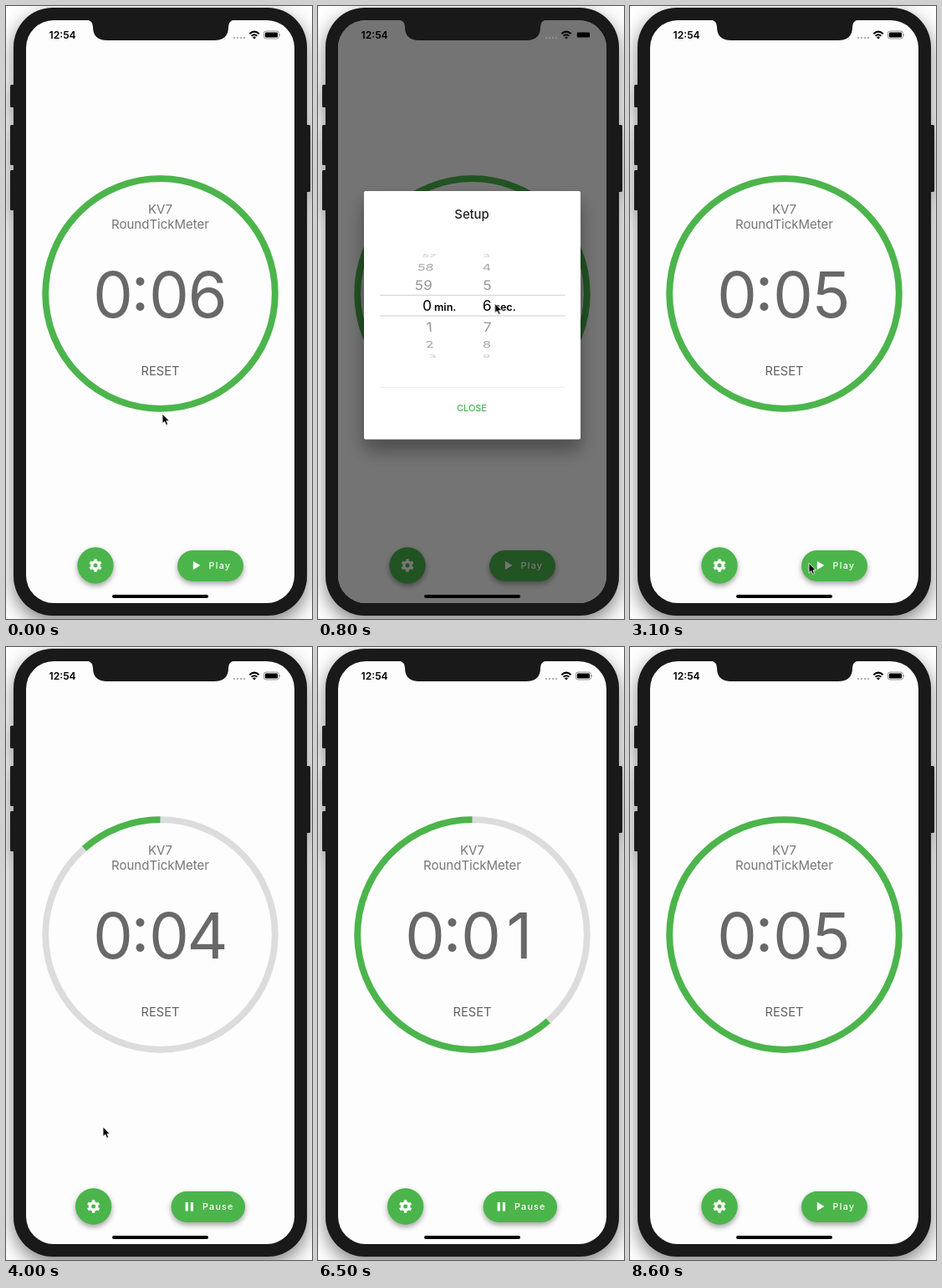
Write an HTML page that moves like this. It is 366 by 732 pixels and loops after 9500 ms.

```html
<!DOCTYPE html>
<html lang="en">
<head>
<meta charset="utf-8">
<title>Countdown</title>
<style>
  html, body { margin: 0; width: 100%; height: 100%; overflow: hidden; background: #fff; }
  svg { display: block; width: 366px; height: 732px; font-family: Inter, Roboto, sans-serif; }
  .mid { text-anchor: middle; }
  .phone { filter: drop-shadow(0 8px 11px rgba(0, 0, 0, .5)); }
  .green { fill: #4bb54b; }
  .fab { filter: drop-shadow(0 3px 3px rgba(0, 0, 0, .36)); }
  .label { font-size: 10.8px; font-weight: 500; letter-spacing: 1.2px; fill: #fff; }
  .card { filter: drop-shadow(0 13px 11px rgba(0, 0, 0, .36)); }
  .clock { font-size: 76px; fill: #686868; }
  .wheel { font-size: 17.5px; text-anchor: end; }
  .unit { font-size: 12.6px; font-weight: 600; }

  .arc, .idle, .busy, .dialog, .press, .cursor { animation: 9500ms linear infinite; }
  .arc { animation-name: arc; stroke-dasharray: 1 2; }
  .idle { animation-name: idle; animation-timing-function: step-end; }
  .busy { animation-name: busy; animation-timing-function: step-end; }
  .dialog { animation-name: dialog; }
  .press { animation-name: press; }
  .cursor { animation-name: cursor; animation-timing-function: ease-in-out; }

  @keyframes arc {
    0%, 36.05% { stroke-dashoffset: 0; }
    36.051% { stroke-dashoffset: 1; }
    88.684%, 100% { stroke-dashoffset: 0; }
  }
  @keyframes idle { 0% { opacity: 1; } 36.05% { opacity: 0; } 88.684%, 100% { opacity: 1; } }
  @keyframes busy { 0% { opacity: 0; } 36.05% { opacity: 1; } 88.684%, 100% { opacity: 0; } }
  @keyframes dialog {
    0%, 4.21% { opacity: 0; }
    6.3%, 30% { opacity: 1; }
    32.1%, 100% { opacity: 0; }
  }
  @keyframes press {
    0%, 25.8% { opacity: 0; }
    27.3%, 34% { opacity: 1; }
    36%, 100% { opacity: 0; }
  }
  @keyframes cursor {
    0% { transform: translate(187px, 487px); }
    3.16%, 4.21% { transform: translate(104px, 666px); }
    8.4%, 11.5% { transform: translate(211.5px, 355px); }
    17%, 22% { transform: translate(198px, 382px); }
    24.8%, 27.4% { transform: translate(181px, 478px); }
    29.4% { transform: translate(212px, 627px); }
    33.2%, 36.3% { transform: translate(214px, 667px); }
    42.1% { transform: translate(116px, 573px); }
    47.4% { transform: translate(95px, 627px); }
    50% { transform: translate(70px, 672px); opacity: 1; }
    50.01%, 100% { transform: translate(70px, 672px); opacity: 0; }
  }
</style>
</head>
<body>
<svg viewBox="0 0 366 732">
  <defs>
    <rect id="screen" x="24" y="17" width="321" height="696" rx="33"/>
    <g id="gear">
      <circle class="green" r="21.7"/>
      <circle r="4.2" fill="none" stroke="#fff" stroke-width="3.4"/>
      <circle r="6.3" fill="none" stroke="#fff" stroke-width="2.8" pathLength="12"
              stroke-dasharray="1 1" stroke-dashoffset="-.5"/>
    </g>
  </defs>

  <g class="phone" fill="#191919">
    <rect x="9" y="2" width="351" height="726" rx="47"/>
    <rect x="5" y="94" width="6" height="27" rx="1.5"/>
    <rect x="5" y="142" width="6" height="48" rx="1.5"/>
    <rect x="5" y="196" width="6" height="48" rx="1.5"/>
    <rect x="358" y="142" width="6" height="80" rx="1.5"/>
  </g>
  <use href="#screen" fill="#fdfdfd"/>

  <g fill="none" stroke-width="7.8" transform="translate(184.5 343.5) rotate(-90) scale(1 -1)">
    <circle r="137.3" stroke="#dcdcdc"/>
    <circle class="arc" r="137.3" stroke="#4bb54b" pathLength="1"/>
  </g>
  <g class="mid" font-size="15" fill="#757575">
    <text x="184.5" y="247.7">KV7</text>
    <text x="184.5" y="266.3">RoundTickMeter</text>
    <text x="184.5" y="440.8" font-size="14.7" fill="#616161">RESET</text>
  </g>
  <g class="clock mid">
    <text x="128" y="371.5">0</text>
    <text x="160.5" y="363.5">:</text>
    <text x="195" y="371.5">0</text>
    <text id="digit" x="241" y="371.5">6</text>
  </g>

  <g class="idle">
    <use class="fab" href="#gear" x="107" y="668"/>
    <rect class="fab green" x="205" y="650" width="79" height="37" rx="18.5"/>
    <path d="M223.8 662.8L232.3 668L223.8 673.2Z" fill="#fff"/>
    <text class="label" x="242.6" y="672">Play</text>
  </g>
  <g class="busy">
    <use class="fab" href="#gear" x="104.6" y="668"/>
    <rect class="fab green" x="197.5" y="650" width="88.5" height="37" rx="18.5"/>
    <path d="M214.6 663h3.2v10.4h-3.2zM220.8 663h3.2v10.4h-3.2z" fill="#fff"/>
    <text class="label" x="235" y="672">Pause</text>
  </g>

  <g class="dialog">
    <use href="#screen" fill-opacity=".54"/>
    <rect class="card" x="55" y="221" width="259" height="296.5" rx="2" fill="#fff"/>
    <text class="mid" x="184" y="254" font-size="14.8" font-weight="500" fill="#212121">Setup</text>
    <path d="M74 345.3H295.5M74 370H295.5" stroke="#ccc"/>
    <path d="M74 455.5H295.5" stroke="#eee"/>
    <g id="minutes" class="wheel"></g>
    <g id="seconds" class="wheel"></g>
    <text class="unit" x="139" y="363.5">min.</text>
    <text class="unit" x="211" y="363.5">sec.</text>
    <rect class="press" x="73.5" y="465" width="222" height="30" fill="#fafafa"/>
    <text class="mid green" x="184" y="484" font-size="10.9" font-weight="500">CLOSE</text>
  </g>

  <path d="M96 16.5Q104 17 104 25Q104 41 121 41H249Q266 41 266 25Q266 17 274 16.5Z" fill="#191919"/>
  <text x="51.5" y="39" font-size="12.2" font-weight="600">12:54</text>
  <path d="M273 38H287" stroke="#999" stroke-opacity=".75" stroke-width="2.4" stroke-linecap="round" stroke-dasharray="0 4"/>
  <g fill="none" stroke="#000" stroke-width="2">
    <path d="M291.3 33.2Q297 28 302.7 33.2M293.6 35.8Q297 32.6 300.4 35.8"/>
    <path d="M295 37.4Q297 35.8 299 37.4L297 39.4Z" fill="#000" stroke="none"/>
  </g>
  <rect x="308.4" y="30" width="18" height="9" rx="2.6" fill="none" stroke="#777" stroke-width=".8"/>
  <rect x="309.8" y="31.4" width="15.2" height="6.2" rx="1.4"/>
  <path d="M327.4 33V36Q329 34.5 327.4 33Z" fill="#777"/>
  <rect x="127" y="703" width="115" height="4" rx="2"/>

  <path class="cursor" d="M0 0V11.6L2.7 9.2L4.6 13.4L6.7 12.5L4.9 8.4H8.5Z"
        stroke="#fff" stroke-width=".9" stroke-linejoin="round"/>
</svg>
<script>
  const LOOP = 9500, START = 3425, RUN = 5000;
  const STEP = 0.403, RADIUS = 63.8;
  const $ = id => document.getElementById(id);

  // A row of the picker drum: foreshortened, sheared and faded by its angle.
  function place(row, n, value, x, lean) {
    const a = (n - value) * STEP, c = Math.cos(a), s = Math.sin(a);
    const size = 1 - 0.26 * (1 - c);
    const left = x + lean * RADIUS * (1 - c);
    row.setAttribute('transform',
      `matrix(${size} 0 ${lean * s} ${size * c} ${left} ${358 + RADIUS * s})`);
    const near = Math.abs(a) < STEP / 2;
    row.setAttribute('opacity', Math.abs(a) > 1.5 ? 0 : near ? 1 : 0.14 + 0.3 * c);
  }

  function makeWheel(id, first, last) {
    const rows = [];
    for (let n = first; n <= last; n++) {
      const el = document.createElementNS('http://www.w3.org/2000/svg', 'text');
      el.textContent = (n + 60) % 60;
      el.setAttribute('y', 6.4);
      $(id).append(el);
      rows.push({ el, n });
    }
    return rows;
  }

  const minutes = makeWheel('minutes', -3, 3);
  const seconds = makeWheel('seconds', 1, 10);
  minutes.forEach(r => place(r.el, r.n, 0, 136, 0.13));

  function draw(t) {
    const p = Math.min(1, Math.max(0, (t - 1100) / 600));
    const value = 6 - p * p * (3 - 2 * p);
    seconds.forEach(r => place(r.el, r.n, value, 207.7, -0.04));

    const left = (START + RUN - t) / 1000;
    const running = t >= START && left > 0;
    $('digit').textContent = running ? Math.min(4, Math.floor(left)) : Math.round(value);
  }

  let origin;
  function tick(now) {
    origin ??= now;
    draw((now - origin) % LOOP);
    requestAnimationFrame(tick);
  }
  draw(0);
  requestAnimationFrame(tick);
</script>
</body>
</html>
```
